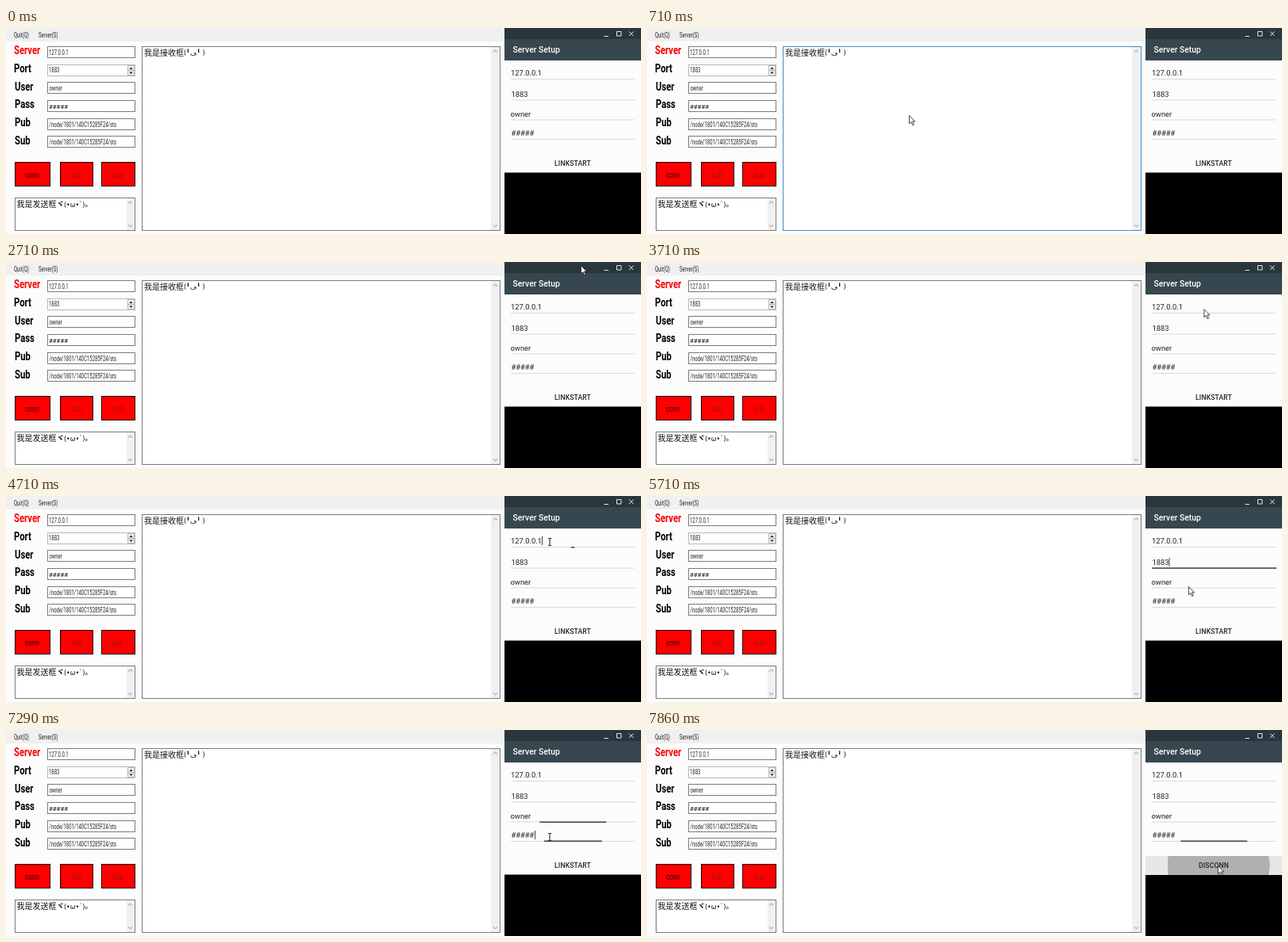
Write an HTML page that moves like this. It is 800 px wide and 260 px high and loops after 8000 ms.

```html
<!DOCTYPE html>
<html lang="en">
<head>
<meta charset="utf-8">
<title>Server setup</title>
<style>
html, body { margin: 0; width: 100%; height: 100%; overflow: hidden; background: #fdfcfd; }
svg { display: block; width: 800px; height: 260px; }

/* desktop form */
.box { fill: #fff; stroke: #7a7a7a; }
.bar { fill: #f0f0f0; }
.chev { fill: none; stroke: #b4b4b4; stroke-width: 1.2; }
.btn { fill: #f00; stroke: #200; }
.tight, .label, .cap { font-family: Roboto, "Liberation Sans", sans-serif; transform-box: fill-box; transform-origin: left; }
.tight { font-size: 9.4px; fill: #222; transform: scaleX(.63); }
.label { font-size: 15.5px; font-weight: 700; transform: scaleX(.73); }
.cap { font-size: 11px; text-anchor: middle; transform-origin: center; transform: scaleX(.74); }
.hash { font: 7.8px Roboto, sans-serif; }
.cjk { font: 10px "Noto Sans CJK SC", "Noto Sans CJK", "DejaVu Sans", sans-serif; fill: #111; }
.face { font: 8px "DejaVu Sans", "Noto Sans CJK SC", sans-serif; fill: #111; }

/* phone form */
.app { font: 9.4px Roboto, sans-serif; fill: #222; }
.title { font: 500 10.4px Roboto, sans-serif; fill: #fff; }
.link { font: 500 8.6px Roboto, sans-serif; letter-spacing: .15px; fill: #222; text-anchor: middle; }
.rule { fill: #d9d9d9; }
.focus { fill: #35454a; transform-origin: 714px 0; }
.caret { fill: #37474f; }

.focus, .caret, .hover, .move, .arrow, .beam, .press, .ripple, .before, .after { animation: 8s linear infinite; }
.caret, .hover, .arrow, .beam, .press, .before, .after { animation-timing-function: step-end; opacity: 0; }

.focus.a { animation-name: line-a; }
.focus.b { animation-name: line-b; }
.focus.c { animation-name: line-c; }
.focus.d { animation-name: line-d; }
@keyframes line-a { 0%, 58.81% { transform: scaleX(0) } 61.69%, 65% { transform: none } 67.88%, 100% { transform: scaleX(0) } }
@keyframes line-b { 0%, 65% { transform: scaleX(0) } 67.88%, 76.62% { transform: none } 79.5%, 100% { transform: scaleX(0) } }
@keyframes line-c { 0%, 76.62% { transform: scaleX(0) } 79.5%, 89.8% { transform: none } 92.68%, 100% { transform: scaleX(0) } }
@keyframes line-d { 0%, 89.8% { transform: scaleX(0) } 92.68%, 96.92% { transform: none } 99.8%, 100% { transform: scaleX(0) } }

.caret.a { animation-name: caret-a; }
.caret.b { animation-name: caret-b; }
.caret.c { animation-name: caret-c; }
.caret.d { animation-name: caret-d; }
@keyframes caret-a { 0% { opacity: 0 } 58.81% { opacity: 1 } 65%, 100% { opacity: 0 } }
@keyframes caret-b { 0% { opacity: 0 } 65% { opacity: 1 } 76.62%, 100% { opacity: 0 } }
@keyframes caret-c { 0% { opacity: 0 } 76.62% { opacity: 1 } 89.8%, 100% { opacity: 0 } }
@keyframes caret-d { 0% { opacity: 0 } 89.8% { opacity: 1 } 96.92%, 100% { opacity: 0 } }

.hover { fill: none; stroke: #222; }
.hover.inbox { stroke: #3c8fc8; animation-name: hover-inbox; }
.hover.user { animation-name: hover-user; }
.hover.pass { animation-name: hover-pass; }
@keyframes hover-inbox { 0% { opacity: 0 } 7% { opacity: 1 } 23% , 100% { opacity: 0 } }
@keyframes hover-user { 0% { opacity: 0 } 17.5% { opacity: 1 } 20.5%, 100% { opacity: 0 } }
@keyframes hover-pass { 0% { opacity: 0 } 15.8% { opacity: 1 } 20.5%, 100% { opacity: 0 } }

.move { animation-name: move; }
.arrow { animation-name: arrow; fill: #fff; stroke: #111; stroke-width: .8; }
.beam { animation-name: beam; fill: none; stroke: #111; }
@keyframes move {
  0%, 5.37% { transform: translate(450px, 14px) }
  8.87%, 12.5% { transform: translate(330px, 110px) }
  16.12% { transform: translate(125px, 98px) }
  17.87% { transform: translate(115px, 72px) }
  19.62% { transform: translate(112px, 45px) }
  21.37% { transform: translate(130px, 40px) }
  26.75% { transform: translate(250px, 34px) }
  32.12% { transform: translate(690px, 12px) }
  33.87% { transform: translate(724px, 4px) }
  37.5%, 41.12% { transform: translate(718px, 14px) }
  50%, 53.62% { transform: translate(690px, 90px) }
  57.12%, 62.5% { transform: translate(685px, 58px) }
  64.37%, 69.62% { transform: translate(685px, 85px) }
  71.37% { transform: translate(682px, 114px) }
  75%, 87.5% { transform: translate(685px, 109px) }
  89.25%, 91.25% { transform: translate(685px, 135px) }
  95%, 100% { transform: translate(719px, 171px) }
}
@keyframes arrow { 0% { opacity: 0 } 5.37% { opacity: 1 } 55.37% { opacity: 0 } 70.5% { opacity: 1 } 73.75% { opacity: 0 } 92.87%, 100% { opacity: 1 } }
@keyframes beam { 0% { opacity: 0 } 55.37% { opacity: 1 } 70.5% { opacity: 0 } 73.75% { opacity: 1 } 92.87%, 100% { opacity: 0 } }

.press { animation-name: press; }
.ripple { fill: #b1b0b1; transform-origin: 720px 171px; animation-name: ripple; }
.before { animation-name: before; }
.after { animation-name: after; }
@keyframes press { 0% { opacity: 0 } 96.92%, 100% { opacity: 1 } }
@keyframes ripple { 0%, 96.92% { transform: scale(0) } 98.25% { transform: none } 100% { transform: scale(1.7) } }
@keyframes before { 0% { opacity: 1 } 97.4%, 100% { opacity: 0 } }
@keyframes after { 0% { opacity: 0 } 97.4%, 100% { opacity: 1 } }
</style>
</head>
<body>
<svg viewBox="0 0 800 260">
  <defs>
    <clipPath id="strip"><rect x="628" y="159" width="172" height="23.5"/></clipPath>
  </defs>

  <rect width="628" height="260" fill="#fdfcfd"/>
  <rect class="bar" width="628" height="17"/>
  <text class="tight" x="10" y="12">Quit(Q)</text>
  <text class="tight" x="41" y="12">Server(S)</text>

  <g>
    <text class="label" x="10" y="33" fill="#f00">Server</text>
    <text class="label" x="10" y="56">Port</text>
    <text class="label" x="11" y="79">User</text>
    <text class="label" x="11" y="101">Pass</text>
    <text class="label" x="11" y="124">Pub</text>
    <text class="label" x="11" y="147">Sub</text>
  </g>

  <g class="box">
    <rect x="52.5" y="23.5" width="110" height="14"/>
    <rect x="52.5" y="46.5" width="110" height="14" stroke="#b8b8b8" style="stroke:#b8b8b8"/>
    <rect x="52.5" y="68.5" width="110" height="14"/>
    <rect x="52.5" y="91.5" width="110" height="14"/>
    <rect x="52.5" y="114.5" width="110" height="14"/>
    <rect x="52.5" y="136.5" width="110" height="14"/>
    <rect x="11.5" y="214.5" width="151" height="41"/>
    <rect x="171.5" y="23.5" width="451" height="232"/>
  </g>
  <rect class="hover user" x="52.5" y="68.5" width="110" height="14"/>
  <rect class="hover pass" x="52.5" y="91.5" width="110" height="14"/>
  <rect class="hover inbox" x="171.5" y="23.5" width="451" height="232"/>

  <text class="tight" x="54" y="34">127.0.0.1</text>
  <text class="tight" x="54" y="56.5">1883</text>
  <text class="tight" x="54.5" y="79">owner</text>
  <text class="hash" x="54" y="102">#####</text>
  <text class="tight" x="54.5" y="125">/node/1801/140C15285F24/sts</text>
  <text class="tight" x="54.5" y="147">/node/1801/140C15285F24/sts</text>

  <!-- port spinner -->
  <path d="M153.5 47.5h8v6h-8zM153.5 53.5h8v6h-8z" fill="#f0f0f0" stroke="#aaa" stroke-width=".8"/>
  <path d="M155.3 52l2.2-2.6 2.2 2.6zM155.3 55.4l2.2 2.6 2.2-2.6z" fill="#222"/>

  <rect class="btn" x="11.5" y="169.5" width="44" height="30"/>
  <rect class="btn" x="68.5" y="169.5" width="41" height="30"/>
  <rect class="btn" x="120.5" y="169.5" width="42" height="30"/>
  <text class="cap" x="33" y="189" fill="#300">conn</text>
  <text class="cap" x="88.5" y="189" fill="#a01010">sub</text>
  <text class="cap" x="141" y="189" fill="#a01010">pub</text>

  <rect class="bar" x="152" y="215" width="10" height="40"/>
  <path class="chev" d="M154 221.5l2.5-2.5 2.5 2.5M154 248.5l2.5 2.5 2.5-2.5"/>
  <rect class="bar" x="611" y="24" width="11" height="231"/>
  <path class="chev" d="M614 30.5l2.5-2.5 2.5 2.5M614 248.5l2.5 2.5 2.5-2.5"/>

  <text class="cjk" x="174" y="34.5">我是接收框</text>
  <text class="face" x="224" y="34">(╹ڡ╹ )</text>
  <text class="cjk" x="13.5" y="226">我是发送框<tspan font-weight="700">ヾ</tspan></text>
  <text class="face" x="73" y="226">(•ω•`)<tspan font-size="5.5">o</tspan></text>

  <!-- phone window -->
  <rect x="628" width="172" height="260"/>
  <rect x="628" y="41" width="172" height="141.5" fill="#fdfcfd"/>
  <rect x="628" width="172" height="14.5" fill="#29363c"/>
  <rect x="628" y="14" width="172" height="27" fill="#37474f"/>
  <path d="M753.5 10.5h5.5M769.5 4.5h5.5v5.5h-5.5zM785 4.5l5.5 5.5m0-5.5l-5.5 5.5" fill="none" stroke="#e4e8ea"/>
  <text class="title" x="638.5" y="31">Server Setup</text>

  <rect class="rule" x="636" y="64" width="156" height="1"/>
  <rect class="rule" x="636" y="90.5" width="156" height="1"/>
  <rect class="rule" x="636" y="115.5" width="156" height="1"/>
  <rect class="rule" x="636" y="140" width="156" height="1"/>
  <rect class="focus a" x="636" y="64" width="157" height="1.5"/>
  <rect class="focus b" x="636" y="90.3" width="157" height="1.5"/>
  <rect class="focus c" x="636" y="115.5" width="157" height="1.5"/>
  <rect class="focus d" x="636" y="139.5" width="157" height="1.5"/>

  <text class="app" x="636" y="60.3">127.0.0.1</text>
  <text class="app" x="636.5" y="87">1883</text>
  <text class="app" x="635.5" y="112">owner</text>
  <text class="app" x="636.5" y="136">#####</text>
  <rect class="caret a" x="675" y="51" width="1" height="11"/>
  <rect class="caret b" x="657.5" y="78" width="1" height="11"/>
  <rect class="caret c" x="662" y="103" width="1" height="11"/>
  <rect class="caret d" x="666" y="127" width="1" height="11"/>

  <g clip-path="url(#strip)">
    <g class="press">
      <rect x="628" y="159" width="172" height="24" fill="#e8e6e8"/>
      <circle class="ripple" cx="720" cy="171" r="64"/>
    </g>
  </g>
  <text class="link before" x="714" y="173.5">LINKSTART</text>
  <text class="link after" x="714" y="173.5">DISCONN</text>

  <g class="move">
    <path class="arrow" d="M.4.5v10.2l2.4-2.2 1.8 4.1 1.7-.8-1.8-3.9h3.1z"/>
    <path class="beam" d="M-2 -4.5h1.5l.5.5.5-.5H2M0-4v8M-2 4.5h1.5L0 4l.5.5H2"/>
  </g>
</svg>
</body>
</html>
```
